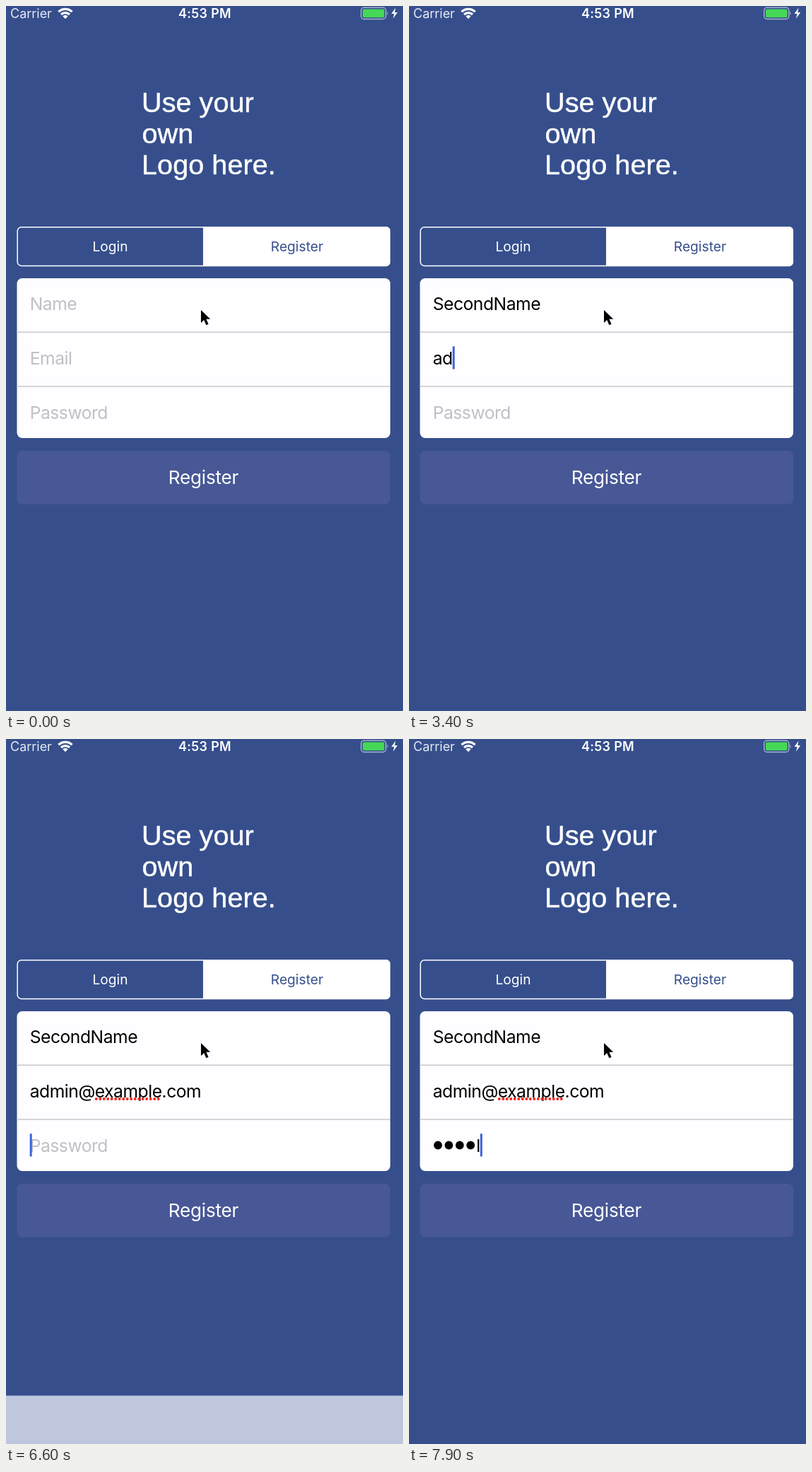
Write an HTML page that moves like this. It is 562 by 997 pixels and loops after 8 s.

```html
<!DOCTYPE html>
<html lang="en">
<head>
<meta charset="utf-8">
<title>Sign-up form</title>
<style>
  html, body { margin: 0; height: 100%; overflow: hidden; background: #364f8c; }
  svg { display: block; width: 100vw; height: 100vh; font-family: Inter, Roboto, sans-serif; }
  .mid { text-anchor: middle; }
  .logo { font: 39.7px "Liberation Sans", Arial, sans-serif; stroke: #fff; stroke-width: .5; }
  .status { font-size: 18px; }
  .tab { font-size: 19.2px; }
  .field { font-size: 24.7px; letter-spacing: -.02em; }
  .submit { font-size: 26.2px; letter-spacing: -.01em; }
  .letter { font-size: 36px; }
  .word { font-size: 23px; }
  .line { fill: none; stroke: #000; stroke-width: 2.2; stroke-linejoin: round; stroke-linecap: round; }
</style>
</head>
<body>
<svg viewBox="0 0 562 997" preserveAspectRatio="none">
  <rect width="562" height="997" fill="#364f8c"/>

  <g fill="#fff">
    <text class="status" x="6" y="17" fill="#e6eaf4">Carrier</text>
    <g fill="none" stroke="#fff" stroke-width="3.2">
      <path d="M74.4 8.2a13.8 13.8 0 0 1 19.2 0M78 12a8.6 8.6 0 0 1 12 0"/>
    </g>
    <path d="M84 18.3l-3.6-3.8a5.2 5.2 0 0 1 7.2 0z"/>
    <text class="status mid" x="281.5" y="17" font-weight="600" letter-spacing=".3">4:53 PM</text>
    <rect x="502.7" y="2.2" width="35" height="16.3" rx="4" fill="none" stroke="#a5b1cd" stroke-width="1.4"/>
    <rect x="505" y="4.5" width="30.5" height="11.8" rx="2" fill="#45d856"/>
    <path d="M539.3 7.5q2.4 2.8 0 5.6z" fill="#a5b1cd"/>
    <path d="M551.5 2.5l-6 8.6h4l-1.5 6.6 6.2-8.8h-4z"/>

    <g class="logo">
      <text x="192" y="150">Use your</text>
      <text x="192.5" y="194">own</text>
      <text x="192" y="238">Logo here.</text>
    </g>

    <rect x="16.2" y="312.8" width="527.1" height="54.6" rx="5.5" fill="none" stroke="#fff" stroke-width="1.5"/>
    <path d="M279 312h259a6 6 0 0 1 6 6v44a6 6 0 0 1-6 6H279z"/>
    <text class="tab mid" x="147.5" y="347">Login</text>
    <text class="tab mid" x="412" y="347" fill="#364f8c">Register</text>

    <rect x="15.5" y="385" width="528.5" height="226" rx="7.5" fill="#fefdff"/>
    <path d="M15.5 461.2H544M15.5 538H544" stroke="#c8c8cd" stroke-width="1.5"/>
    <rect x="15.5" y="629" width="528.5" height="75.5" rx="7.5" fill="#485896"/>
    <text class="submit mid" x="279.5" y="676">Register</text>
  </g>

  <g id="fields"></g>
  <path id="dots" fill="none" stroke="#000" stroke-width="11.8" stroke-linecap="round" stroke-dasharray="0 15.4"/>
  <path id="spell" fill="none" stroke="#f5261f" stroke-width="4" stroke-linecap="round" stroke-dasharray="0 5.5"/>
  <rect id="caret" width="3" height="32.5" rx="1" fill="#3b63de"/>
  <g id="keyboard">
    <rect width="562" height="330" fill="#bec7de"/>
    <g id="keys"></g>
  </g>

  <path d="M276 430v18l4.2-4 3.2 7.2 3.2-1.4-3.2-7h5.8z" fill="#000" stroke="#fff" stroke-width="1.3" paint-order="stroke"/>
</svg>

<script>
const $ = id => document.getElementById(id);
const LOOP = 8000, STEP = 100;
const LEFT = 33.7, DOT = 15.4, ROW = 76.8;
const RISE = 6543, KEYS_SHOWN = 6700, FALL = 7340;

// Each key press time, in tenths of a second
const rows = [
  { hint: 'Name', value: 'SecondName', focus: 1, keys: [10, 12, 14, 16, 17, 18, 19, 20, 21, 22] },
  { hint: 'Email', value: 'admin@example.com', focus: 27,
    keys: [32, 34, 35, 37, 39, 41, 48, 49, 50, 51, 52, 54, 55, 56, 58, 60, 62] },
  { hint: 'Password', value: 'local', focus: 64, keys: [73, 74, 76, 77, 79], secret: true }
];

function add(parent, tag, attrs, text = '') {
  const el = document.createElementNS('http://www.w3.org/2000/svg', tag);
  for (const name in attrs) el.setAttribute(name, attrs[name]);
  el.textContent = text;
  return parent.appendChild(el);
}

rows.forEach((row, i) => {
  row.el = add($('fields'), 'text', { class: 'field', x: LEFT, y: 430 + ROW * i });
});

function buildKeys(board) {
  const key = (x, y, w, label, cls, fill = '#fdfdff') => {
    add(board, 'rect', { x, y: y + 1.6, width: w, height: 62.5, rx: 7, fill: '#858fae' });
    add(board, 'rect', { x, y, width: w, height: 62.5, rx: 7, fill });
    add(board, 'text', { class: cls + ' mid', x: x + w / 2, y: y + (cls === 'word' ? 40 : 41) }, label);
  };
  const dark = '#8fa0ca';
  [['qwertyuiop', 2], ['asdfghjkl', 29.5], ['zxcvbnm', 86]].forEach(([letters, x], r) =>
    [...letters].forEach((c, i) => key(x + 56.45 * i, 12 + 81.2 * r, 47, c, 'letter')));
  key(2, 174.4, 63, '', 'word', dark);
  key(494, 174.4, 63, '', 'word', dark);
  key(2, 255.5, 60.5, '123', 'word', dark);
  key(72, 255.5, 61, '', 'word', dark);
  key(142, 255.5, 274.5, 'space', 'word');
  key(426, 255.5, 131, 'return', 'word', dark);

  const line = d => add(board, 'path', { class: 'line', d });
  line('M33.5 194l13.5 13.5h-6.5v11.5h-14v-11.5h-6.5z');
  line('M509.5 206.5l9-10q1.5-1.5 3.5-1.5h17q3.5 0 3.5 3.5v16q0 3.5-3.5 3.5h-17q-2 0-3.5-1.5zM524 201.5l10 10m0-10l-10 10');
  line('M88 287.5a14.5 14.5 0 1 1 29 0a14.5 14.5 0 1 1-29 0zh29M102.5 273v29' +
       'M102.5 273c-10 8-10 21 0 29c10-8 10-21 0-29M91.5 279.5q11 5 22 0M91.5 295.5q11-5 22 0')
    .style.strokeWidth = 1.7;
}
buildKeys($('keys'));

// Critically damped approach from 0 to 1
function spring(ms) {
  const p = Math.max(0, ms) * 0.015;
  return 1 - (1 + p) * Math.exp(-p);
}

function show(el, on) {
  el.setAttribute('display', on ? 'inline' : 'none');
}

function draw(t) {
  const tick = t / 100;
  let active = -1, caretX = LEFT;

  rows.forEach((row, i) => {
    const n = row.keys.filter(k => k <= tick).length;
    const hidden = row.secret && n ? n - 1 : 0;
    row.el.textContent = n ? row.value.slice(hidden, n) : row.hint;
    row.el.setAttribute('fill', n ? '#000' : '#c0c0c5');
    row.el.setAttribute('x', LEFT + hidden * DOT);
    if (row.secret) {
      $('dots').setAttribute('d', hidden ? `M41 574.5h${(hidden - 1) * DOT + .1}` : '');
    }
    if (tick >= row.focus) {
      active = i;
      caretX = LEFT + hidden * DOT + (n ? row.el.getComputedTextLength() : 0);
    }
  });

  const caret = $('caret');
  show(caret, active >= 0);
  caret.setAttribute('x', caretX);
  caret.setAttribute('y', 404.5 + ROW * Math.max(0, active));

  const mail = rows[1];
  let mark = '';
  if (active === 2) {
    const from = mail.el.getStartPositionOfChar(mail.value.indexOf('@') + 1).x;
    const to = mail.el.getStartPositionOfChar(mail.value.indexOf('.')).x;
    mark = `M${from + 2} 509H${to - 1}`;
  }
  $('spell').setAttribute('d', mark);

  const shown = spring(t - RISE) - spring(t - FALL);
  $('keyboard').setAttribute('transform', `translate(0 ${997 - 324 * shown})`);
  show($('keyboard'), shown > .004);
  show($('keys'), t >= KEYS_SHOWN);
}

function frame() {
  const t = performance.now() % LOOP;
  draw(Math.floor(t / STEP) * STEP);
  requestAnimationFrame(frame);
}
frame();
</script>
</body>
</html>
```
